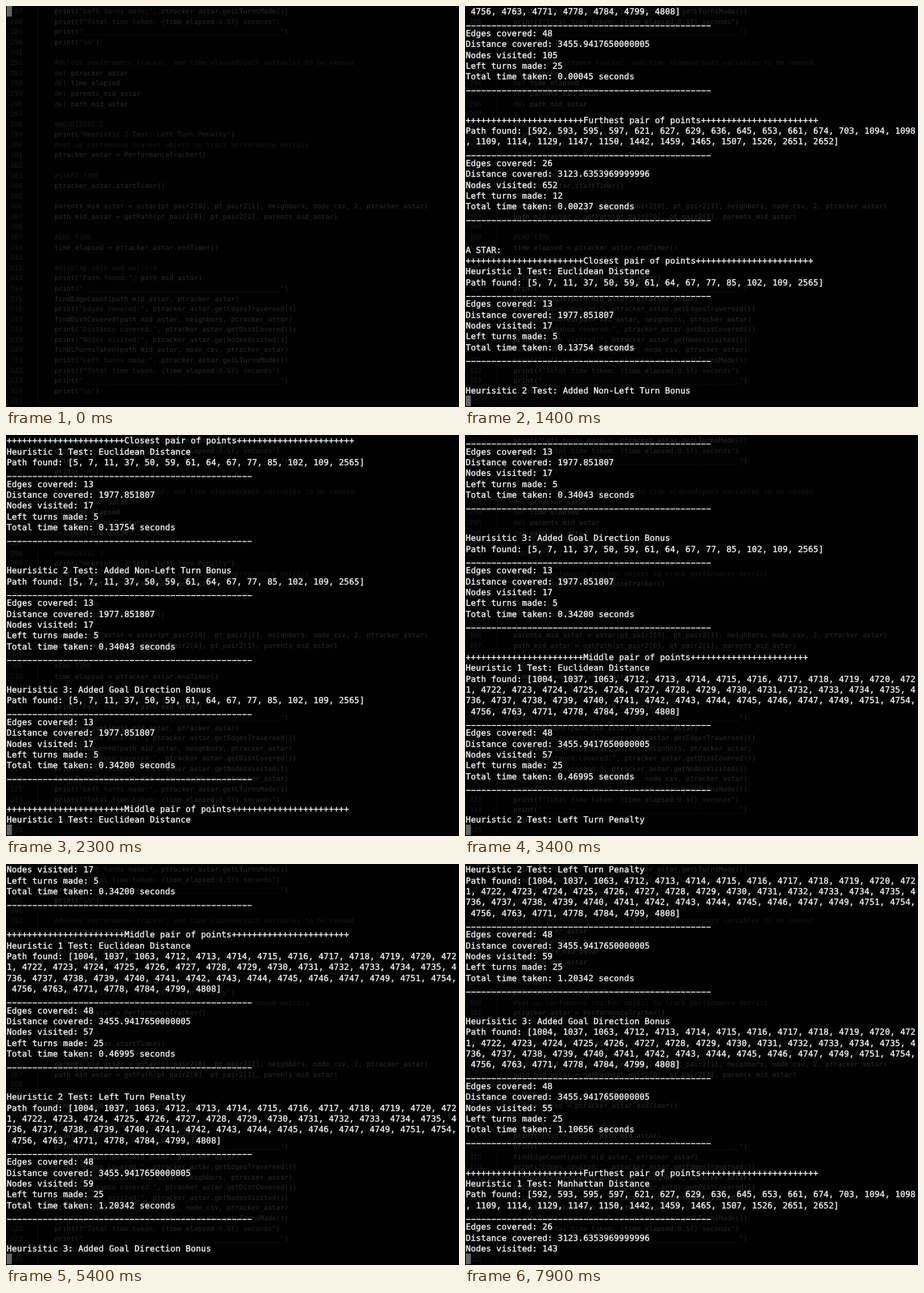
These frames come from a looping animation (600 by 531 pixels, 8000 ms). An HTML page with a canvas:

```html
<!DOCTYPE html>
<html lang="en">
<head>
<meta charset="utf-8">
<title>Path search output</title>
<style>
  html, body { margin: 0; width: 100%; height: 100%; overflow: hidden; background: #020102; }
  canvas { display: block; }
</style>
</head>
<body>
<canvas id="stage" width="600" height="531"></canvas>
<script>
const LOOP = 8000;
const COLS = 88, ROWS = 37;
const TERM = { size: 11, cell: 6.77, pitch: 14.33, left: 1, base: 11.4, weight: 0.35 };
const CODE = { size: 9.04, cell: 5.44, pitch: 13.58, left: 64, base: 10.3, weight: 0 };
const TONE = { plain: '#292929', string: '#212120', comment: '#171710', keyword: '#1c1c1e', number: '#181819' };

const ctx = document.getElementById('stage').getContext('2d');

// ---- Editor showing through the terminal window ----

const RULE = '_'.repeat(48);
const SUMMARY = [
  'print("Left turns made:", ptracker_astar.getLTurnsMade())',
  'print(f"Total time taken: {time_elapsed:0.5f} seconds")',
  `print("${RULE}")`,
  'print("\\n")',
  ''
];
const SOURCE = [
  ...SUMMARY,
  '#delete performance tracker, and time elapsed/path variables to be reused',
  'del ptracker_astar',
  'del time_elapsed',
  'del parents_mid_astar',
  'del path_mid_astar',
  '',
  '#HEURISTIC 2',
  'print("Heuristic 2 Test: Left Turn Penalty")',
  '#set-up perfomance tracker object to track performance metrics',
  'ptracker_astar = PerformanceTracker()',
  '',
  '#START TIME',
  'ptracker_astar.startTimer()',
  '',
  'parents_mid_astar = astar(pt_pair2[0], pt_pair2[1], neighbors, node_csv, 2, ptracker_astar)',
  'path_mid_astar = getPath(pt_pair2[0], pt_pair2[1], parents_mid_astar)',
  '',
  '#END TIME',
  'time_elapsed = ptracker_astar.endTimer()',
  '',
  '#display path and metrics',
  'print("Path found:", path_mid_astar)',
  `print("${RULE}")`,
  'findEdgeCount(path_mid_astar, ptracker_astar)',
  'print("Edges covered:", ptracker_astar.getEdgesTraversed())',
  'findDistCovered(path_mid_astar, neighbors, ptracker_astar)',
  'print("Distance covered:", ptracker_astar.getDistCovered())',
  'print("Nodes visited:", ptracker_astar.getNodesVisited())',
  'findLTurnsTaken(path_mid_astar, node_csv, ptracker_astar)',
  ...SUMMARY
];
const FIRST_LINE = 287;

function toneOf(token) {
  if (token[0] === '#') return TONE.comment;
  if (token === 'del') return TONE.keyword;
  return /^f?"|"$/.test(token) ? TONE.string : TONE.plain;
}

// ---- Program output, with the moments at which it pauses ----

const lines = [], marks = [];
const print = (...texts) => {
  for (const text of texts) {
    for (let i = 0; i === 0 || i < text.length; i += COLS) lines.push(text.slice(i, i + COLS));
  }
};
const mark = time => marks.push({ time, count: lines.length });
const heading = name => {
  const plus = '+'.repeat(23);
  print(`${plus}${name} pair of points${plus}`);
};

const closest = { path: [5, 7, 11, 37, 50, 59, 61, 64, 67, 77, 85, 102, 109, 2565], dist: '1977.851807', turns: 5 };
const middle = {
  path: [1004, 1037, 1063, ...Array.from({ length: 36 }, (_, i) => 4712 + i),
    4749, 4751, 4754, 4756, 4763, 4771, 4778, 4784, 4799, 4808],
  dist: '3455.9417650000005', turns: 25
};
const furthest = {
  path: [592, 593, 595, 597, 621, 627, 629, 636, 645, 653, 661, 674, 703, 1094, 1098, 1109, 1114,
    1129, 1147, 1150, 1442, 1459, 1465, 1507, 1526, 2651, 2652],
  dist: '3123.6353969999996', turns: 12
};

// Counting left turns is slow, so each report pauses after the visited nodes.
function report(route, nodes, seconds, time) {
  print(`Path found: [${route.path.join(', ')}]`, RULE,
    `Edges covered: ${route.path.length - 1}`,
    `Distance covered: ${route.dist}`,
    `Nodes visited: ${nodes}`);
  mark(time);
  print(`Left turns made: ${route.turns}`, `Total time taken: ${seconds} seconds`, RULE, '', '');
}

const EUCLID = 'Heuristic 1 Test: Euclidean Distance';
const GOAL = 'Heurisitic 3: Added Goal Direction Bonus';

mark(0);
print('Pairs of points:', 'Closest: 5, 2565', 'Middle: 1004, 4808', 'Furthest: 592, 2652', RULE, '', '', '');
mark(200);
print('DIJKSTRA:');
heading('Closest');
report(closest, 60, '0.00029', 300);
heading('Middle');
report(middle, 105, '0.00045', 400);
heading('Furthest');
report(furthest, 652, '0.00237', 900);
print('A STAR:');
heading('Closest');
print(EUCLID);
mark(1100);
report(closest, 17, '0.13754', 1300);
print('Heurisitic 2 Test: Added Non-Left Turn Bonus');
mark(1400);
report(closest, 17, '0.34043', 1700);
print(GOAL);
mark(1800);
report(closest, 17, '0.34200', 2200);
heading('Middle');
print(EUCLID);
mark(2300);
report(middle, 57, '0.46995', 2800);
print('Heuristic 2 Test: Left Turn Penalty');
mark(3300);
report(middle, 59, '1.20342', 4500);
print(GOAL);
mark(5000);
report(middle, 55, '1.10656', 6100);
heading('Furthest');
print('Heuristic 1 Test: Manhattan Distance');
mark(6600);
report(furthest, 143, '0.00000', 7800);

// ---- Drawing ----

function useFont(grid) {
  ctx.font = `${grid.size}px "DejaVu Sans Mono", monospace`;
  ctx.textRendering = 'geometricPrecision';
  ctx.lineJoin = 'round';
}

function drawText(grid, text, row, color, col = 0, left = grid.left) {
  ctx.fillStyle = ctx.strokeStyle = color;
  ctx.lineWidth = grid.weight;
  const y = grid.base + row * grid.pitch;
  [...text].forEach((ch, i) => {
    if (ch === ' ') return;
    const x = left + (col + i) * grid.cell;
    ctx.fillText(ch, x, y);
    if (grid.weight) ctx.strokeText(ch, x, y);
  });
}

// Terminal underscores are short dashes just under the baseline.
function drawRule(row, color) {
  ctx.fillStyle = color;
  for (let i = 0; i < RULE.length; i++) {
    ctx.fillRect(TERM.left + i * TERM.cell + 0.5, TERM.base + row * TERM.pitch, TERM.cell - 1, 1.2);
  }
}

function drawEditor() {
  ctx.fillStyle = '#020102';
  ctx.fillRect(0, 0, 600, 531);
  ctx.fillStyle = '#0a0a0b';
  ctx.fillRect(42, 0, 1, 531);
  useFont(CODE);
  SOURCE.forEach((text, row) => {
    drawText(CODE, String(FIRST_LINE + row), row, TONE.number, 0, 5.5);
    let col = 0;
    const tokens = text.match(/^#.*|f"[^{]*\{|time_elapsed|:0\.5f\}[^"]*"|"[^"]*"|\w+|[^\w"]/g) || [];
    for (const token of tokens) {
      drawText(CODE, token, row, toneOf(token), col);
      col += token.length;
    }
  });
}

function drawTerminal(count) {
  const top = Math.max(0, count - ROWS + 1);
  const ink = '#f4f4f4';
  ctx.fillStyle = '#646464';
  ctx.fillRect(TERM.left, (count - top) * TERM.pitch, TERM.cell, 14);
  useFont(TERM);
  lines.slice(top, count).forEach((text, row) => {
    if (text === RULE) drawRule(row, ink);
    else drawText(TERM, text, row, ink);
  });
}

let shown = -1;
function frame(now) {
  const time = now % LOOP;
  const { count } = marks.findLast(m => m.time <= time);
  if (count !== shown) {
    shown = count;
    drawEditor();
    drawTerminal(count);
  }
  requestAnimationFrame(frame);
}
frame(0);
</script>
</body>
</html>
```
